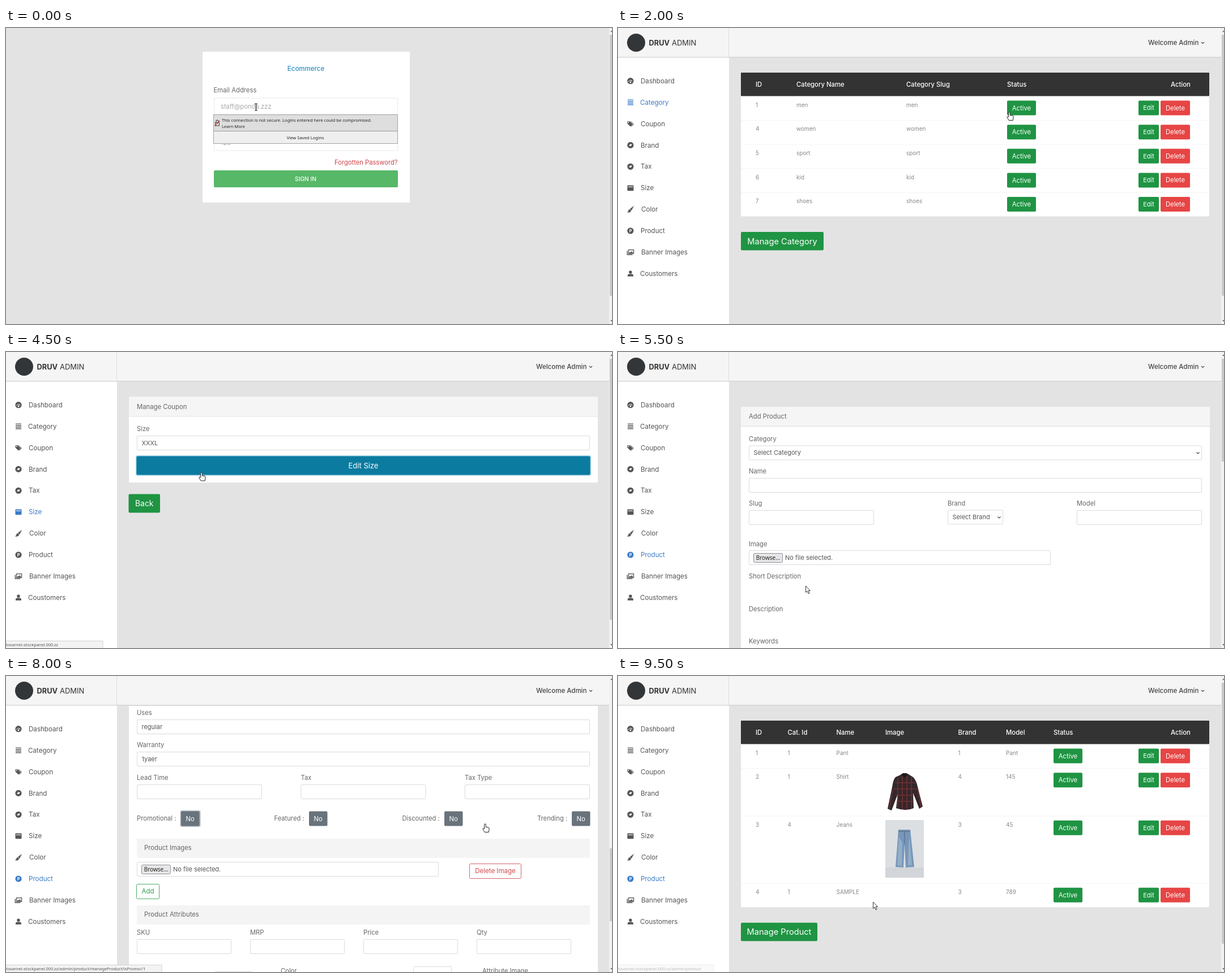
These frames come from a looping animation (1070x524 px, 10 s). An HTML page:

```html
<!DOCTYPE html>
<html lang="en">
<head>
<meta charset="utf-8">
<title>Shop admin tour</title>
<style>
  html, body { margin: 0; width: 100%; height: 100%; overflow: hidden; background: #e3e3e3; }
  svg { display: block; width: 1070px; height: 524px; }
  text { font-family: Inter, sans-serif; white-space: pre; }
  .ui { font-family: "Noto Sans", "Open Sans", sans-serif; }
  .scene { visibility: hidden; animation: show 10s step-end infinite; }
  @keyframes show {
    0% { visibility: visible; }
    5%, 100% { visibility: hidden; }
  }
</style>
</head>
<body>
<svg id="stage" viewBox="0 0 1070 524" xmlns="http://www.w3.org/2000/svg"></svg>
<script>
const GREEN = '#1f9443', RED = '#e74545', GREY = '#69737c', BLUE = '#3b7cc6', INK = '#555', DARK = '#333';
const HOST = 'tovarnel-stockpanel.000.zz';
const SLOT = 0.5, LOOP = 10;

// ---- basic parts; text is placed by the middle of its capitals ----
const text = (x, y, str, size = 11.3, fill = INK, attr = '') =>
  `<text x="${x}" y="${y + size * 0.36}" font-size="${size}" fill="${fill}" ${attr}>${str}</text>`;
const mid = (x, y, str, size, fill, attr = '') =>
  text(x, y, str, size, fill, `text-anchor="middle" ${attr}`);
const box = (x, y, w, h, fill, attr = '') =>
  `<rect x="${x}" y="${y}" width="${w}" height="${h}" fill="${fill}" ${attr}/>`;
const path = (d, fill, attr = '') => `<path d="${d}" fill="${fill}" ${attr}/>`;
const at = (x, y, body, attr = '') => `<g transform="translate(${x} ${y})" ${attr}>${body}</g>`;
const button = (x, y, w, h, str, fill, size = 11.3) =>
  box(x, y, w, h, fill, 'rx="2"') + mid(x + w / 2, y + h / 2, str, size, '#fff');
const outline = (x, y, w, str, color) =>
  box(x + .5, y + .5, w - 1, 26, '#fff', `rx="2" stroke="${color}" stroke-opacity=".85"`) +
  mid(x + w / 2, y + 13.2, str, 11.5, color);
const field = (x, y, w, str = '') =>
  box(x + .5, y + .5, w - 1, 25, '#fff', 'rx="1.5" stroke="#d9dbdd"') + (str ? text(x + 8.5, y + 13, str, 11) : '');
const labeled = (x, y, w, name, str) => text(x, y, name, 11.2, '#666') + field(x, y + 12, w, str);
const chevron = (x, y) => path(`M${x - 2.5} ${y - 1}l2.5 2.5 2.5-2.5`, 'none', 'stroke="#444" stroke-width="1.1"');
const select = (x, y, w, str) => field(x, y, w, str) + chevron(x + w - 7, y + 13);
const fileInput = (x, y, w) => field(x, y, w) +
  box(x + 8.5, y + 5.5, 51, 16, '#e6e6e6', 'rx="2" stroke="#8f8f9d"') +
  mid(x + 34, y + 13.5, 'Browse...', 10, '#222', 'class="ui" font-weight="500"') +
  text(x + 64, y + 13.5, 'No file selected.', 11);
const backButton = y => button(216.5, y - .5, 55.5, 33, 'Back', GREEN, 13.9);

// ---- pointers, placed by their tip ----
const hand = (x, y) => at(x, y, path(
  'M-1.3 1C-1.3-.6 1.3-.6 1.3 1V5.4L6 6.3Q7.4 6.7 7.2 8.4L6.2 14.5H-.8L-4 9.3Q-4.4 7.6-2.8 7.6L-1.3 8.8Z',
  '#fff', 'stroke="#222" stroke-width="1" stroke-linejoin="round"'));
const arrow = (x, y) => at(x, y, path('M0 0V11.5L2.6 9.2 4.5 13.8 6.5 13 4.6 8.6H8Z', '#fff',
  'stroke="#222" stroke-width=".9" stroke-linejoin="round"'));
const beam = (x, y) => path(`M${x - 2.5} ${y - 6}h5M${x - 2.5} ${y + 6}h5M${x} ${y - 6}v12`, 'none', 'stroke="#222" stroke-width="1.2"');

const scrollbar = (top = 12, h = 462) => box(1065, 0, 5, 524, '#f1f1f1') + box(1066, top, 4, h, '#c9c9c9') +
  path('M1067 7l3-3v3zM1067 517h3v3z', '#666');
const status = (route, w, fade = 1) => at(0, 511, box(-1, .5, w, 13, '#f3f3f3', 'stroke="#d2d2d2"') +
  text(0, 7.3, HOST + route, 7.4, '#555', 'class="ui"'), `opacity="${fade}"`);

// ---- sidebar ----
const disc = c => `<circle r="5.6" fill="${c}"/>`;
const turn = c => disc(c) + path('M-2.8 1.2L-.6-1.8 3-1.6 .8 1.8Z', '#fff');
const icons = {
  Dashboard: c => disc(c) + path('M-3.4 1.5A3.5 3.5 0 0 1 3.4 1.5M0 2.5L1.6-2', 'none', 'stroke="#fff" stroke-width="1.1" stroke-dasharray="1.8 1"') + '<circle cy="2.4" r="1.3" fill="#fff"/>',
  Category: c => path('M-5-4.2H5M-5-1.4H5M-5 1.4H5M-5 4.2H5', 'none', `stroke="${c}" stroke-width="1.4"`),
  Coupon: c => path('M-5.5-4.2H-1L4 .8-.2 5-5.5-.2ZM1-4.2L6 .8 1.8 5 1 4.3 4.8.7 0-4.2Z', c) + '<circle cx="-3.5" cy="-2.3" r="1" fill="#fff"/>',
  Brand: turn,
  Tax: turn,
  Size: c => box(-5.5, -4.8, 11, 9.8, c, 'rx="1.2"') + box(-4.2, -2.6, 8.4, 1.1, '#fff'),
  Color: c => path('M5.5-5.5L1.8 1.6-.8-.6ZM-1.4.2L1 2.3Q.2 5.6-5.5 5.2-3.4 4-3.4 2.2-3-.1-1.4.2Z', c, `stroke="${c}" stroke-width=".6"`),
  Product: c => disc(c) + mid(.2, .2, 'P', 7.5, '#fff', 'font-weight="700"'),
  'Banner Images': c => path('M-5.6-2.5V4.4H3.6', 'none', `stroke="${c}" stroke-width="1.4"`) + box(-3.4, -4.2, 9, 6.6, '#fff', `stroke="${c}" stroke-width="1.3"`) + path('M-2.6 1.8L-.6-.8.6.4 2.6-2 4.8 1.8Z', c),
  Coustomers: c => `<circle cy="-2.6" r="2.7" fill="${c}"/>` + path('M-5 5V3Q-5 .8-2.4.8H2.4Q5 .8 5 3V5Z', c)
};
const names = Object.keys(icons);
const indent = { Category: 39, Coustomers: 39, Color: 41, 'Banner Images': 41 };
const itemY = name => 93.7 + names.indexOf(name) * 37.9;
const item = (name, color) => at(22, itemY(name), icons[name](color)) +
  text(indent[name] || 40, itemY(name), name, 11.6, color);

// lit names the blue menu items
const frame = lit =>
  box(0, 51, 196, 473, '#fff') + box(0, 51, 1065, 1, '#d6d6d6') + box(196, 52, 869, 1, '#dbdbdb') +
  box(0, 0, 1065, 51, '#f5f5f5') + box(0, 52, 196, 1, '#eee') + box(195, 0, 1, 51, '#dedede') +
  '<circle cx="32" cy="26" r="16" fill="#333639"/>' +
  text(54.5, 26, 'DRUV', 12.8, '#333', 'font-weight="700"') + text(95, 26, 'ADMIN', 13, '#333') +
  text(936, 26, 'Welcome Admin', 11.5, '#444', 'font-weight="500"') + chevron(1032.5, 26) +
  names.map(n => item(n, lit.includes(n) ? BLUE : INK)).join('');

// the content scrolls beneath the fixed frame
const page = (lit, body, bar = scrollbar()) => body + frame(lit) + bar;

// ---- list pages ----
// cols: [x, title]; rows: {cells, on, h, pic}
function table(cols, rows, statusX, label, labelW) {
  const total = rows.reduce((sum, r) => sum + (r.h || 42.65), 0);
  let y = 120.3;
  let out = box(217, 100, 827, 20.3 + total, '#fff', 'rx="3"') + box(217, 79, 827, 41.5, DARK, 'rx="1"');
  const head = (x, s) => text(x, 100, s, 11.3, '#fff', 'font-weight="500"');
  out += cols.map(c => head(...c)).join('') + head(statusX, 'Status') + head(976, 'Action');
  rows.forEach((r, i) => {
    if (i) out += box(217, y, 827, 1, '#f4f4f4');
    out += r.cells.map((s, j) => s === '' ? '' : text(cols[j][0], y + 15.7, s, 10, '#888')).join('');
    if (r.pic) out += r.pic(y + 8);
    const b = y + 8.2;
    out += r.on === false ? button(statusX, b, 85, 26, 'Deactivated', GREY) : button(statusX, b, 51, 26, 'Active', GREEN);
    out += button(919, b, 36, 26, 'Edit', GREEN, 11) + button(958, b, 52, 26, 'Delete', RED, 11.2);
    y += r.h || 42.65;
  });
  return out + button(217, y + 27.5, labelW, 32.5, label, GREEN, 14.6);
}
const rowsOf = (...list) => list.map(cells => ({ cells }));

const categories = off => {
  const rows = [[1, 'men'], [4, 'women'], [5, 'sport'], [6, 'kid'], [7, 'shoes']].map(([id, n]) => ({ cells: [id, n, n] }));
  if (off) rows[0].on = false;
  return table([[243, 'ID'], [315, 'Category Name'], [509, 'Category Slug']], rows, 687, 'Manage Category', 146);
};
const coupons = () => table([[243, 'ID'], [315, 'Title'], [440, 'Code'], [565, 'Value']],
  rowsOf([1, 'New year', 'NEW50', 50], [2, 'Summer', 'SUN20', 20]), 687, 'Manage Coupon', 138);
const brands = () => {
  const rows = rowsOf([1, 'Drelo'], [3, 'VUNA'], [4, 'ZB']);
  rows[0].on = false;
  return table([[243, 'ID'], [339, 'Brand']], rows, 485, 'Manage Brand', 122);
};
const sizes = () => table([[243, 'ID'], [339, 'Size']],
  rowsOf([1, 'XL'], [2, 'XXL'], [3, 'XXXL']), 485, 'Manage Size', 110);

const shirt = y => at(472, y, path('M27 4L33 2 41 3 49 8Q55 14 57 25L66 60 60 64 49 36 50 63Q36 69 19 63L22 38 11 67 4 64 12 26Q14 12 18 8Z', '#33272b') +
  path('M22 9V62M30 4V65M38 4V66M46 8V63M17 18H54M15 29H56M20 40H50M20 51H50M13 30L7 64M57 27L63 60', 'none', 'stroke="#873336" stroke-width="1.6" opacity=".75"') +
  path('M27 4L34 9 41 3 37 1H31Z', '#1d1a1f'));
const jeans = y => at(472, y - .5, box(0, 0, 68, 102, '#dcdfe2') + box(0, 84, 68, 18, '#d2d5d9') +
  path('M23 17H44L47 46 51 83 36 84 34 43 32 84 18 83 21 46Z', '#7896b8') +
  path('M24 30L21 80 29 82 30 40ZM43 30L41 45 40 80 47 80Z', '#91aeca') +
  path('M23 20H44M34 20V42', 'none', 'stroke="#526f92" stroke-width="1.2"'));
const products = added => {
  const rows = [
    { cells: [1, 1, 'Pant', '', 1, 'Pant'] },
    { cells: [2, 1, 'Shirt', '', 4, 145], h: 84.6, pic: shirt },
    { cells: [3, 4, 'Jeans', '', 3, 45], h: 119, pic: jeans }
  ];
  if (added) rows.push({ cells: [4, 1, 'SAMPLE', '', 3, 789] });
  return table([[243, 'ID'], [299.5, 'Cat. Id'], [385.5, 'Name'], [472, 'Image'], [600.5, 'Brand'], [685, 'Model']],
    rows, 769, 'Manage Product', 135);
};

// ---- forms ----
const card = (y, h, title) => box(217, y, 828, h, '#fff') +
  box(217, y, 828, 34, '#f5f5f5') + box(217, y + 34, 828, 1, '#e0e0e0') + text(231, y + 17, title, 11.3, '#666');

const editSize = () => card(79.5, 151.5, 'Manage Coupon') + labeled(231, 136, 800, 'Size', 'XXXL') +
  box(229, 183, 804, 36, '#a3d3e6', 'rx="3"') + button(230.5, 184.5, 801, 33, 'Edit Size', '#0b7ba0', 13) +
  backButton(252);

function editor(y, name) {
  let out = text(231, y, name, 11.2, '#666') + box(231.5, y + 12.5, 799, 238, '#fff', 'stroke="#d1d1d1"') +
    box(232, y + 13, 798, 56, '#f8f8f8') + box(232, y + 69, 798, 1, '#d1d1d1') +
    box(232, y + 231, 798, 19, '#f8f8f8') + box(232, y + 230, 798, 1, '#d1d1d1');
  for (let i = 0; i < 44; i++) {
    const row = i % 2, col = i >> 1;
    out += box(241 + col * 19 + (col >> 2) * 9, y + 23 + row * 25, 9, 9, '#8c8c8c', 'rx="1.5"');
  }
  return out;
}
const toggle = (x, bx, y, name) => text(x, y, name + ' :', 11.2, '#666') + button(bx, y - 12.5, 32.5, 26, 'No', GREY);
const section = (y, name) => box(231, y, 800, 34, '#f4f4f4') + text(244, y + 15.5, name, 11.3, '#666');

// ready: the rich text editors have loaded and the fields are filled in
function productForm(scroll, ready) {
  const grow = ready ? 211 : 0, val = s => ready ? s : '';
  const label = (x, y, s) => text(x, y, s, 11.2, '#666');
  const area = (y, name) => ready ? editor(y, name) : label(231, y, name);
  const body = card(97, 1205 + grow * 3, 'Add Product') +
    label(231, 154, 'Category') + select(231, 165.5, 800, ready ? 'men' : 'Select Category') +
    labeled(231, 211, 800, 'Name', val('SAMPLE')) +
    labeled(231, 268, 221, 'Slug', val('sample')) +
    label(582, 268, 'Brand') + select(582, 279.5, 98, ready ? 'VUNA' : 'Select Brand') +
    labeled(810, 268, 221, 'Model', val('789')) +
    label(231, 340, 'Image') + fileInput(231, 351, 533) +
    area(397, 'Short Description') + area(454.5 + grow, 'Description') +
    labeled(231, 512 + grow * 2, 800, 'Keywords', val('sample')) +
    area(569 + grow * 2, 'Technical Specification') +
    at(0, 562 + grow * 3,
      labeled(231, 65, 800, 'Uses', val('regular')) + labeled(231, 122, 800, 'Warranty', val('1yaer')) +
      labeled(231, 180, 221, 'Lead Time') + labeled(520.5, 180, 221, 'Tax') + labeled(810, 180, 221, 'Tax Type') +
      box(307.5, 238, 36, 29, '#b4b9bd', 'rx="3"') +
      toggle(231, 309, 252, 'Promotional') + toggle(473.5, 535, 252, 'Featured') +
      toggle(699.5, 774, 252, 'Discounted') + toggle(938, 999, 252, 'Trending') +
      section(288, 'Product Images') + fileInput(231, 329, 533) + outline(818, 332, 92, 'Delete Image', '#d0494d') +
      outline(230, 368, 41, 'Add', '#2f9c50') + section(406, 'Product Attributes') +
      ['SKU', 'MRP', 'Price', 'Qty'].map((n, i) => labeled(231 + i * 200, 454, 167, n)).join('') +
      label(231, 536, 'Size') + select(368, 523, 68, '') + label(485, 522, 'Color') + select(719, 514, 68, '') +
      label(841, 522, 'Attribute Image') + fileInput(831, 534, 190) +
      outline(230, 600, 41, 'Add', '#2f9c50') + button(231, 650, 800, 32, 'Add Product', '#0b7ba0', 13) +
      backButton(762));
  const bar = ready ? scrollbar(11 + scroll * 502 / 2040, 129) : scrollbar(12, 182);
  return page(['Product'], at(0, -scroll, body), bar);
}

// ---- sign-in ----
function login(filled) {
  const input = (y, s) => box(367.5, y + .5, 324, 29, '#fff', 'stroke="#e9e9e9"') + text(379, y + 15, s, 11.2, filled ? INK : '#aaa');
  let out = box(347, 42, 366, 267, '#fff') + mid(529.5, 71.5, 'Ecommerce', 11.5, '#2c8dc4', 'font-weight="500"') +
    text(366.5, 109.5, 'Email Address', 11.3, '#666') + input(123.5, 'staff@ponda.zzz') +
    text(366.5, 173, 'Password', 11.3, '#666') + input(187.5, filled ? '•••' : '123') +
    text(691.5, 238, 'Forgotten Password?', 11.2, '#d04548', 'text-anchor="end"');
  if (filled) out += box(365.5, 250.5, 328, 33, '#b5dfbd', 'rx="3"');
  out += box(367, 252, 325, 30, '#57b868', 'rx="2"') + mid(529, 267, 'SIGN IN', 10.2, '#fff', 'font-weight="500"');
  if (filled) return out + hand(560, 264) + scrollbar();
  const note = (y, s) => text(381, y, s, 7.6, '#222', 'class="ui" font-weight="500"');
  return out + box(366.5, 153.5, 325, 51, '#efefef', 'stroke="#a5a5a5"') +
    box(367, 154, 324, 28, '#dedede') + box(367, 182, 324, 1, '#999') +
    note(163, 'This connection is not secure. Logins entered here could be compromised.') + note(174, 'Learn More') +
    mid(528.5, 194.5, 'View Saved Logins', 7.65, '#222', 'class="ui"') +
    path('M371 168V165.5Q371 163 373 163T375 165.5V168', 'none', 'stroke="#444" stroke-width="1.2"') +
    box(369.5, 167.5, 7, 5.5, '#ddd', 'stroke="#444"') + path('M368.5 173.5L377.5 164', 'none', 'stroke="#d33" stroke-width="1.3"') +
    beam(441.5, 140) + scrollbar();
}

const scenes = [
  login(false),
  login(true),
  page(['Dashboard'], '') + arrow(420, 250),
  page(['Dashboard', 'Category'], '') + status('/admin/category', 172) + hand(82, 126),
  page(['Category'], categories(false)) + hand(691, 149),
  page(['Category', 'Coupon'], categories(true)) + status('/admin/coupon', 164) + hand(80, 164),
  page(['Coupon', 'Brand'], coupons()) + status('/admin/brand', 160) + hand(80, 202),
  page(['Brand', 'Size'], brands()) + status('/admin/size', 156) + hand(81, 277.5),
  page(['Size'], sizes()) + status('/admin/size/manageSize/3', 209) + hand(936, 230),
  page(['Size'], editSize()) + status('', 172) + hand(345, 213.5),
  page(['Product'], products(false)) + status('/admin/product/manageProduct', 228) + hand(300, 408),
  productForm(0, false) + arrow(331.5, 414),
  productForm(0, true) + arrow(336, 400),
  productForm(300, true) + arrow(350, 360),
  productForm(640, true) + arrow(420, 320),
  productForm(1000, true) + arrow(480, 290),
  productForm(1195, true) + status('/admin/product/manageProduct/isPromo//1', 276) + hand(846, 262),
  productForm(1516, true) + arrow(640, 300),
  productForm(1516, true) + hand(631, 344),
  page(['Product'], products(true)) + status('/admin/product', 170, .4) + arrow(450.5, 400)
];

// negative delays put every scene in its own slot of the loop
document.getElementById('stage').innerHTML = box(0, 0, 1070, 524, '#e3e3e3') +
  scenes.map((s, i) => `<g class="scene" style="animation-delay:${i ? i * SLOT - LOOP : 0}s">${s}</g>`).join('');
</script>
</body>
</html>
```
